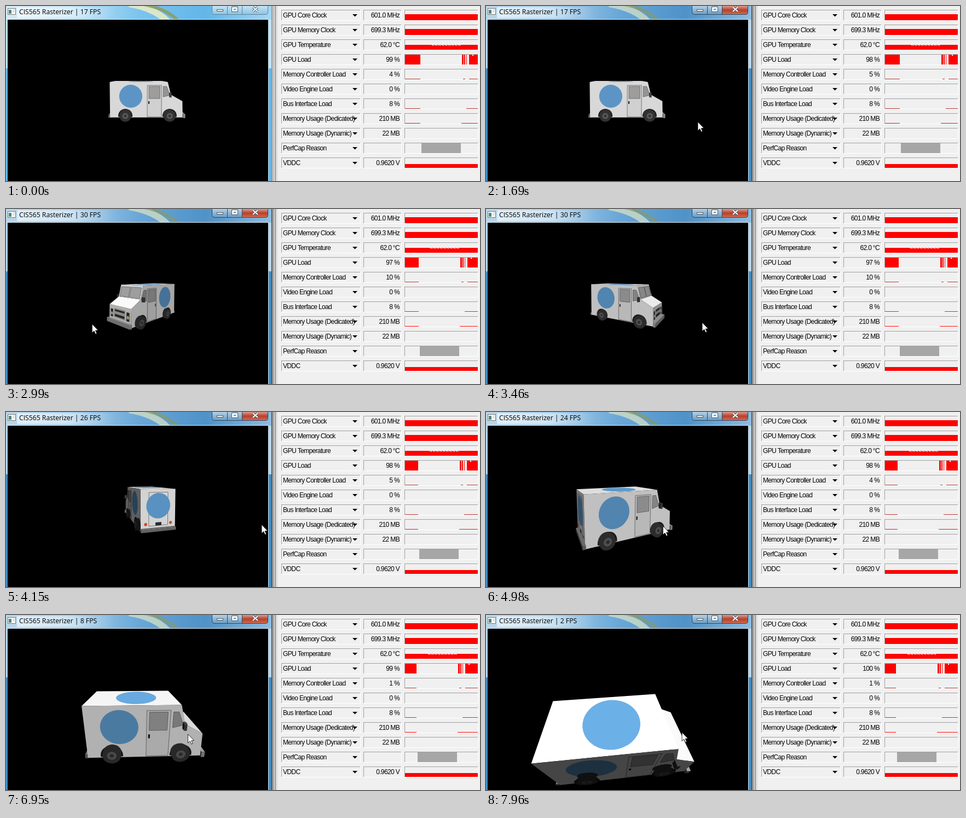
Animation, 866 px wide and 320 px high, one loop 8 s. Source, as an HTML page with a canvas:

```html
<!DOCTYPE html>
<html lang="en">
<head>
<meta charset="utf-8">
<title>Rasterizer</title>
<style>
html, body { margin: 0; width: 100%; height: 100%; overflow: hidden; background: #f0f0f0; }
canvas { display: block; }
</style>
</head>
<body>
<canvas id="stage" width="866" height="320"></canvas>
<script>
const ctx = document.getElementById('stage').getContext('2d');
const LOOP = 8000, ENTER = 1060, ACTIVATE = 1200, RED = '#ff0000';

// Mouse strokes: time, pointer x, truck yaw
const STROKES = [
  [ENTER, 470, 0], [1690, 387, 0], [1900, 366, 0], [2460, 216, -90], [2850, 120, -150], [3460, 395, -32],
  [3730, 137, -78], [4150, 467, 105], [4430, 467, 105], [5150, 300, 12], [5970, 308, -2], [7960, 358, 5.5]
];

const smooth = (from, to, t) => {
  const u = Math.min(1, Math.max(0, (t - from) / (to - from)));
  return u * u * (3 - 2 * u);
};

function strokeAt(t) {
  const i = Math.max(1, STROKES.findIndex(k => t < k[0]));
  const last = t >= 7960 ? STROKES.length - 1 : i;
  const [a, b] = [STROKES[last - 1], STROKES[last]];
  const e = smooth(a[0], b[0], t);
  return { x: a[1] + (b[1] - a[1]) * e, yaw: a[2] + (b[2] - a[2]) * e };
}

// Everything about the camera except yaw follows from how far it has moved in.
function cameraAt(t) {
  const zoom = 0.61 * smooth(4430, 5200, t) + 0.39 * smooth(6430, 7960, t);
  return {
    yaw: strokeAt(t).yaw * Math.PI / 180,
    pitch: (3 + 41 * zoom ** 3.5) * Math.PI / 180,
    distance: 268 - 131 * zoom,
    shift: [15 - 11.6 * zoom, -27.5 - 19.5 * zoom ** 2.5]
  };
}

function rect(color, x, y, w, h) {
  ctx.fillStyle = color;
  ctx.fillRect(x, y, w, h);
}

function polygon(points, fill, stroke) {
  ctx.beginPath();
  points.forEach(p => ctx.lineTo(p[0], p[1]));
  ctx.closePath();
  ctx.fillStyle = fill;
  ctx.fill();
  if (!stroke) return;
  ctx.strokeStyle = stroke;
  ctx.lineWidth = 0.8;
  ctx.stroke();
}

function gradient(x, y, x2, y2, ...colors) {
  const g = ctx.createLinearGradient(x, y, x2, y2);
  colors.forEach((c, i) => g.addColorStop(i / (colors.length - 1), c));
  return g;
}

const circle = (x, y, r) => Array.from({ length: 40 }, (_, i) =>
  [x + r * Math.cos(i * Math.PI / 20), y + r * Math.sin(i * Math.PI / 20)]);
const box = (x, y, x2, y2) => [[x, y], [x2, y], [x2, y2], [x, y2]];
const both = make => [-1, 1].flatMap(make);
const gray = v => [v, v, v];

// ---- delivery truck: x forward, y up, z to its side ----
const FOCAL = 240, CENTER = [241, 141], HALF = 29, FLOOR = -34, AXLES = [-38, 43], AXLE_Y = -31;
const BLUE = [108, 176, 232], WHITE = gray(255), DARK = gray(52);
const PROFILE = [[-66, FLOOR], [-66, 31], [39, 31], [45, 8], [66, -4], [67, FLOOR]];

// Marks on the faces along the profile: z across, u along the edge
const rearMarks = [
  [WHITE, box(-16, 8, 16, 60), true], [BLUE, circle(0, 39, 20)], [DARK, box(-5, 8, 5, 13)],
  ...both(s => [[[250, 90, 40], circle(s * 21, 11, 2.5)]])
];
const roofMarks = [[BLUE, circle(0, 57, 25)]];
const windshieldMarks = both(s => [[gray(195), box(s, 4, s * 26, 22.5), true]]);
const frontMarks = [
  [gray(200), box(-15, 5, 15, 21)], [DARK, box(-13, 7, 13, 10)], [DARK, box(-13, 15, 13, 19)],
  ...both(s => [[DARK, box(s * 18, 7, s * 25, 21)], [[250, 226, 180], circle(s * 21.5, 15, 2.8)]])
];

const edgeFaces = [rearMarks, roofMarks, windshieldMarks, [], frontMarks].map((marks, i) => {
  const [x, y] = PROFILE[i], dx = PROFILE[i + 1][0] - x, dy = PROFILE[i + 1][1] - y;
  const length = Math.hypot(dx, dy), ux = dx / length, uy = dy / length;
  return { normal: [-uy, ux, 0], map: (z, u) => [x + ux * u, y + uy * u, z], color: WHITE,
    outline: box(-HALF, 0, HALF, length), marks };
});

const sideFace = s => ({
  normal: [0, 0, s], map: (x, y) => [x, y, s * HALF], color: WHITE, outline: PROFILE,
  marks: [
    [BLUE, circle(-28, 5, 21)],
    [gray(245), box(2, -33, 28, 25), true],
    [gray(185), box(5, 1, 25, 23), true],
    [gray(175), [[31, 23], [37, 23], [43, 7], [31, 4]], true],
    [gray(30), box(4, -9, 6, -4)],
    ...AXLES.map(x => [gray(30), circle(x, AXLE_Y, 13).filter(p => p[1] >= FLOOR)])
  ]
});

const BODY = [...edgeFaces.reverse(), sideFace(1), sideFace(-1)];

// A block spans center ± size on each axis.
const block = (center, size, shade) => [0, 1, 2].flatMap(axis => both(s => {
  const [p, q] = [0, 1, 2].filter(k => k !== axis);
  const fill = (onAxis, a, b) => { const v = []; v[axis] = onAxis; v[p] = a; v[q] = b; return v; };
  return [{ normal: fill(s, 0, 0), color: gray(shade), marks: [],
    map: (a, b) => fill(center[axis] + s * size[axis], center[p] + a * size[p], center[q] + b * size[q]),
    outline: box(-1, -1, 1, 1) }];
}));

const wheel = (x, s) => [24, 27, 30].map(z => ({
  normal: [0, 0, s], twoSided: true, map: (a, b) => [a, b, s * z], color: gray(58),
  outline: circle(x, AXLE_Y, 10.8),
  marks: z === 30 ? [[gray(105), circle(x, AXLE_Y, 5.5)], [gray(60), circle(x, AXLE_Y, 2.5)]] : []
}));

// Attachments are painted over the body only when their mounting side is visible.
const ATTACHED = [
  { normal: [1, 0, 0], at: [67, -30, 0], faces: block([69, -31, 0], [2, 3.5, 31], 165) },
  { normal: [-1, 0, 0], at: [-66, -32, 0], faces: block([-67, -32, 0], [2, 2.5, 29], 120) },
  ...both(s => [
    ...AXLES.map(x => ({ normal: [0, 0, s], at: [x, AXLE_Y, s * HALF], faces: wheel(x, s) })),
    { normal: [0, 0, s], at: [43, 8, s * HALF], faces: block([43, 8, s * 33], [1.5, 4, 2.5], 70) }
  ])
];

function drawTruck(t) {
  const { yaw, pitch, distance, shift } = cameraAt(t);
  const rotate = ([x, y, z]) => {
    const depth = z * Math.cos(yaw) - x * Math.sin(yaw);
    return [x * Math.cos(yaw) + z * Math.sin(yaw),
      y * Math.cos(pitch) - depth * Math.sin(pitch), y * Math.sin(pitch) + depth * Math.cos(pitch)];
  };
  const view = p => {
    const [x, y, z] = rotate(p);
    return [x + shift[0], y + shift[1], z - distance];
  };
  const project = p => {
    const [x, y, z] = view(p);
    return [CENTER[0] - FOCAL * x / z, CENTER[1] + FOCAL * y / z];
  };
  const visible = (normal, at) => {
    const n = rotate(normal), v = view(at);
    return n[0] * v[0] + n[1] * v[1] + n[2] * v[2] < 0;
  };
  const drawFace = face => {
    const place = uv => face.map(uv[0], uv[1]);
    if (!face.twoSided && !visible(face.normal, place(face.outline[0]))) return;
    const n = rotate(face.normal);
    const light = Math.min(1, Math.max(0.22, 0.2 + 0.6 * n[1] + 0.68 * n[2]));
    const tint = c => `rgb(${c.map(v => Math.round(v * light)).join()})`;
    polygon(face.outline.map(p => project(place(p))), tint(face.color));
    for (const [color, points, edged] of face.marks)
      polygon(points.map(p => project(place(p))), tint(color), edged && tint(gray(115)));
  };
  const front = ATTACHED.filter(p => visible(p.normal, p.at));
  ATTACHED.filter(p => !front.includes(p)).forEach(p => p.faces.forEach(drawFace));
  BODY.forEach(drawFace);
  front.forEach(p => p.faces.forEach(drawFace));
}

// ---- window ----
function drawGlass(active) {
  rect(active ? gradient(0, 0, 486, 0, '#b9d6ea', '#a9cfea', '#69a7d8', '#4f92c8', '#8fbde0')
    : gradient(0, 0, 486, 0, '#d6eaf6', '#bfe1f5', '#7cc4ee', '#62b6e8', '#a7d7f3'), 0, 0, 486, 25);
  ctx.globalAlpha = active ? 0.6 : 0.8;
  for (const [color, width, x] of [['#f3f1c4', 12, 225], ['#8f9a55', 6, 246]]) {
    ctx.strokeStyle = color;
    ctx.lineWidth = width;
    ctx.beginPath();
    ctx.moveTo(x, -4);
    ctx.quadraticCurveTo(x + 48, 4, x + 72, 30);
    ctx.stroke();
  }
  ctx.globalAlpha = 1;
  rect(gradient(20, 0, 200, 0, 'rgba(255,255,255,.6)', 'rgba(255,255,255,.45)', 'rgba(255,255,255,0)'), 20, 2, 180, 20);
  for (const [x, w] of [[0, 3], [479, 7]]) {
    rect(active ? '#b4d4ea' : '#bfe3f7', x, 25, w, 89);
    rect(active ? '#3f8cc6' : '#5fb9ea', x, 114, w, 206);
  }
  rect('#e2f1fa', 2, 24, 478, 1);
  rect('#e2f1fa', 479, 25, 1, 295);
  rect(gradient(486, 0, 498, 0, active ? '#888888' : '#b5b5b5', '#d4d4d4', '#f0f0f0'), 486, 0, 12, 320);
  rect(active ? '#263c50' : '#6f93a8', 485, 0, 1, 320);
  rect('#7c7c7c', 492, 0, 1, 320);
}

function drawButtons(active) {
  const frame = active ? '#2c4a63' : '#5d8298', ink = '#4b5c69';
  ctx.save();
  ctx.beginPath();
  ctx.roundRect(376.5, -5, 102, 20.5, 4);
  ctx.clip();
  rect(active ? gradient(0, 0, 0, 15, '#b4d0e5', '#6a9cc4') : gradient(0, 0, 0, 15, '#c5e3f4', '#8cc5e6'), 376, 0, 103, 16);
  if (active) rect(gradient(0, 0, 0, 15, '#dc9a8c', '#b8402c', '#cc6a50'), 432, 0, 47, 16);
  ctx.restore();
  ctx.strokeStyle = frame;
  ctx.lineWidth = 1;
  ctx.stroke();
  for (const x of [404, 431]) rect(frame, x, 0, 1, 15);
  ctx.strokeStyle = ink;
  for (const [x, y, w, h] of [[385.5, 6.5, 11, 3], [412.5, 1.5, 11, 9]]) {
    rect('#fff', x, y, w, h);
    ctx.strokeRect(x, y, w, h);
  }
  rect('#5f89a6', 416, 5, 4, 2);
  for (const [color, width] of [[ink, 4], ['#fff', 2]]) {
    ctx.strokeStyle = color;
    ctx.lineWidth = width;
    ctx.beginPath();
    for (const s of [-1, 1]) {
      ctx.moveTo(455.5 - s * 4.5, 2);
      ctx.lineTo(455.5 + s * 4.5, 10);
    }
    ctx.stroke();
  }
}

function drawTitle(fps) {
  rect('#777', 3, 4, 15, 12);
  rect('#fff', 4, 5, 13, 10);
  rect('#4c8b78', 5, 7, 5, 7);
  for (const y of [7, 10]) rect('#b5b5b5', 12, y, 4, 1);
  ctx.fillStyle = '#000';
  ctx.textAlign = 'left';
  ctx.letterSpacing = '0px';
  ctx.font = '12.2px "Open Sans", "Noto Sans", sans-serif';
  ctx.fillText(`CIS565 Rasterizer | ${fps} FPS`, 24, 15);
}

function drawViewport(t) {
  ctx.save();
  ctx.beginPath();
  ctx.rect(3, 25, 476, 295);
  ctx.clip();
  rect('#000', 3, 25, 476, 295);
  drawTruck(t);
  ctx.restore();
}

// ---- sensor panel: readings change and graphs move left once a second ----
const FPS = [17, 17, 18, 30, 26, 24, 21, 8, 2];
const MEM_LOAD = [4, 5, 5, 10, 5, 4, 2, 1, 1];
const gpuLoad = step => Math.round(97.4 + Math.abs(step - 3) / 2);
const LEFT = 729, RIGHT = 862, BUSY_END = 757, BUSY_START = 833;

function sunken(x, y, w) {
  rect('#a0a0a0', x, y, w, 1);
  rect('#a0a0a0', x, y, 1, 19);
  rect('#fff', x, y + 19, w, 1);
  rect('#fff', x + w - 1, y, 1, 20);
}

function drawPanel(step) {
  const span = (color, from, to, y, h) => {
    const x = Math.max(LEFT, from - step), end = to === RIGHT ? RIGHT : to - step;
    if (end > x) rect(color, x, y, end - x, h);
  };
  const level = h => y => rect(RED, LEFT, y + 19 - h, RIGHT - LEFT, h);
  const trace = (color, resume) => y => {
    span(color, LEFT, BUSY_END, y + 18, 1);
    span(color, resume, RIGHT, y + 18, 1);
  };
  const temperature = y => {
    level(9)(y);
    for (let x = 778; x < 830; x += 3) span('#fff', x, x + 2 - x % 2, y + 10, 1 + x % 2);
  };
  const load = y => {
    span(RED, LEFT, BUSY_END, y + 1, 18);
    for (let i = 0; i < 3; i++) span(RED, BUSY_START + 4 * i, BUSY_START + 4 * i + 3 - i, y + 1, 18);
    span(RED, BUSY_START + 13, RIGHT, y + 1, 18);
    span('#fff', 852, 854, y + 1, 2);
  };
  const memory = y => {
    span('#b03030', BUSY_START + 2, BUSY_START + 6, y + 18, 1);
    trace('#b03030', BUSY_START + 13)(y);
  };
  const rows = [
    ['GPU Core Clock', '601.0 MHz', level(11)],
    ['GPU Memory Clock', '699.3 MHz', level(11)],
    ['GPU Temperature', '62.0 °C', temperature],
    ['GPU Load', gpuLoad(step) + ' %', load],
    ['Memory Controller Load', MEM_LOAD[step] + ' %', memory],
    ['Video Engine Load', '0 %'],
    ['Bus Interface Load', '8 %', trace('#b03030', BUSY_START + 8)],
    ['Memory Usage (Dedicated)', '210 MB', trace(RED, BUSY_START - 1)],
    ['Memory Usage (Dynamic)', '22 MB'],
    ['PerfCap Reason', '', y => span('#a6a6a6', 759, 831, y + 1, 18)],
    ['VDDC', '0.9620 V', level(7)]
  ];
  ctx.font = '12px "Liberation Sans", Arial, sans-serif';
  ctx.letterSpacing = '-0.65px';
  rows.forEach(([label, value, graph], i) => {
    const y = 7 + 27 * i;
    sunken(503, y, 145);
    sunken(653, y, 70);
    sunken(728, y, 135);
    ctx.fillStyle = '#000';
    ctx.textAlign = 'left';
    ctx.fillText(label, 506, y + 14);
    ctx.textAlign = 'right';
    ctx.fillText(value, 719, y + 14);
    polygon([[633, y + 8], [642, y + 8], [637.5, y + 12.5]], '#000');
    if (graph) graph(y);
  });
}

function drawPointer(t) {
  if (t < ENTER) return;
  const x = strokeAt(t).x;
  const y = 212 + 78 * (1 - smooth(ENTER, 1690, t)) - 6 * Math.sin((t - 2700) / 900) * smooth(1900, 3400, t);
  const arrow = [[0, 0], [0, 16], [3.7, 12.6], [6.2, 18.2], [8.6, 17.2], [6.2, 11.7], [11, 11.3]];
  polygon(arrow.map(p => [x + p[0], y + p[1]]), '#fff', '#000');
}

function draw(t) {
  const step = Math.max(0, Math.floor((t + 130) / 1000));
  const active = t >= ACTIVATE;
  rect('#f0f0f0', 0, 0, 866, 320);
  drawGlass(active);
  drawButtons(active);
  drawTitle(FPS[step]);
  drawViewport(t);
  drawPanel(step);
  drawPointer(t);
}

const start = performance.now();
function tick() {
  draw((performance.now() - start) % LOOP);
  requestAnimationFrame(tick);
}
tick();
</script>
</body>
</html>
```
